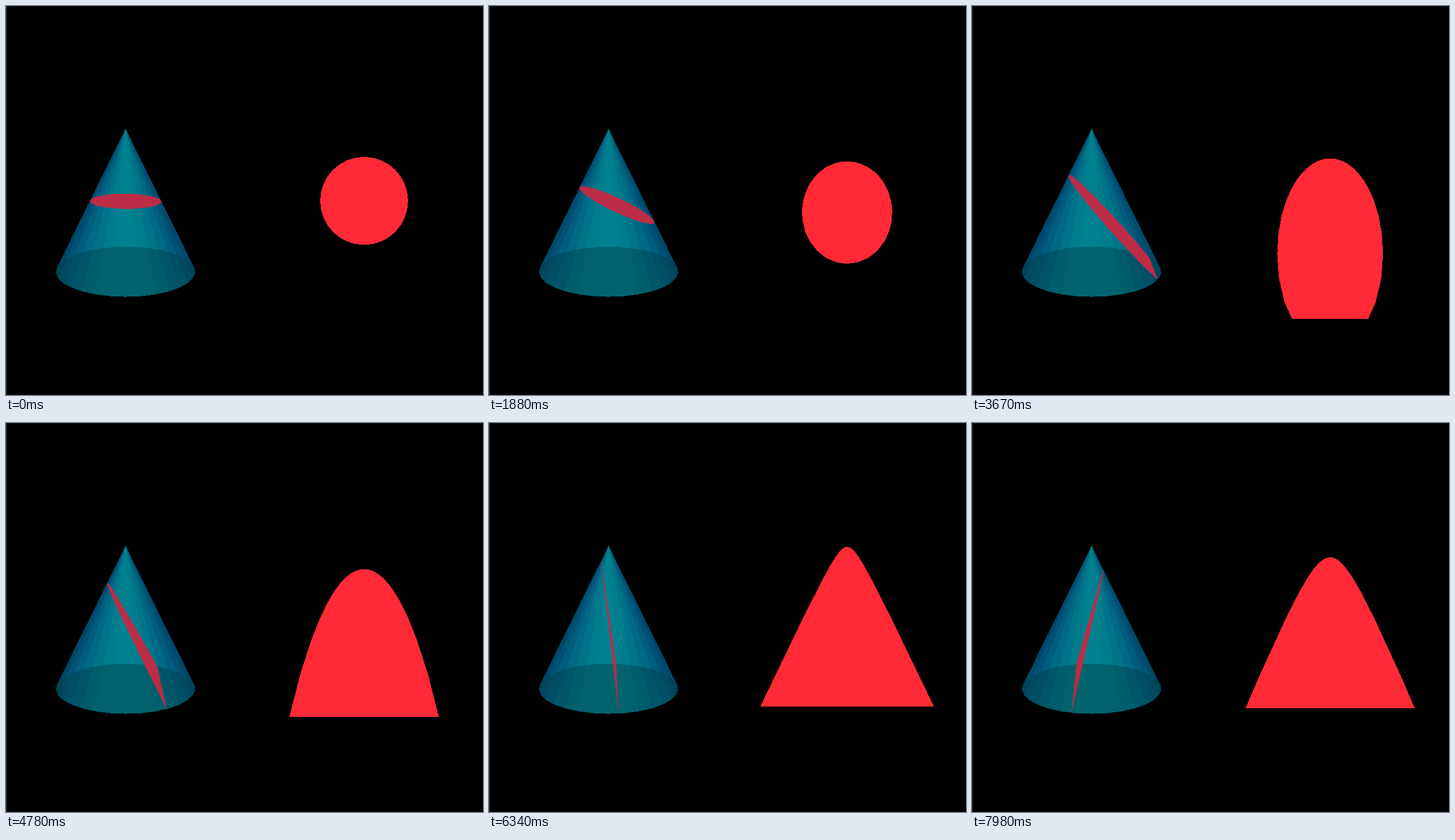
Recreate the animation shown at these times as an HTML page. Size 829 px wide and 675 px high, loop 8000 ms.

```html
<!DOCTYPE html>
<html lang="en">
<head>
<meta charset="utf-8">
<title>Conic sections</title>
<style>
  html, body { margin: 0; width: 100%; height: 100%; overflow: hidden; background: #000; }
  svg { display: block; width: 100%; height: 100%; }
</style>
</head>
<body>
<svg viewBox="0 0 829 675" shape-rendering="crispEdges">
  <rect width="829" height="675" fill="#000"/>
  <rect width="829" height="1" fill="#1c1c1c"/>
  <rect y="674" width="829" height="1" fill="#1d1214"/>
  <rect width="1" height="675" fill="#404040"/>
  <g id="cone"></g>
  <polygon id="cut" fill="#bc2c46"/>
  <polygon id="face" fill="#ff2a36"/>
</svg>
<script>
const LOOP = 8000, SIDES = 32, TAU = 2 * Math.PI;
const RADIUS = 2, TOP = 2, HEIGHT = 4;
const CAM = { x: 207.8, y: 337.8, scale: 61.8, dist: 12.8, sin: 0.21, cos: Math.sqrt(1 - 0.21 ** 2) };
const FLAT = { x: 622.4, y: 337.9, scale: 76.4 };
const cone = document.getElementById('cone');
const cut = document.getElementById('cut');
const face = document.getElementById('face');

// Perspective view from slightly above; z points to the viewer.
function project([x, y, z]) {
  const k = CAM.scale * CAM.dist / (CAM.dist - y * CAM.sin - z * CAM.cos);
  return [CAM.x + k * x, CAM.y - k * (y * CAM.cos - z * CAM.sin)];
}

const toPoints = list => list.map(p => p.map(v => v.toFixed(2)).join()).join(' ');

function addPolygon(points, fill) {
  const el = document.createElementNS('http://www.w3.org/2000/svg', 'polygon');
  el.setAttribute('points', toPoints(points.map(project)));
  el.setAttribute('fill', fill);
  cone.append(el);
}

const apex = [0, TOP, 0];
const rim = Array.from({ length: SIDES }, (_, i) => {
  const a = i * TAU / SIDES;
  return [RADIUS * Math.cos(a), TOP - HEIGHT, RADIUS * Math.sin(a)];
});
const next = i => rim[(i + 1) % SIDES];

function drawCone() {
  rim.map((p, i) => ({ p, q: next(i), facing: Math.sin((i + 0.5) * TAU / SIDES) }))
    .sort((a, b) => a.facing - b.facing)
    .forEach(({ p, q, facing }) => {
      const c = Math.max(0, facing);
      addPolygon([apex, p, q], `rgb(0,${Math.round(68 + 62 * c * c)},${Math.round(93 + 50 * c)})`);
    });
  addPolygon(rim, 'rgba(0,60,66,.42)');
}

// Corners where the plane x sin + y cos = 0 meets the cone's edges.
function section(angle) {
  const s = Math.sin(angle), c = Math.cos(angle);
  const side = p => p[0] * s + p[1] * c;
  const found = [];
  const meet = (p, q) => {
    const a = side(p), b = side(q);
    if (a * b >= 0) return;
    const k = a / (a - b);
    found.push(p.map((v, i) => v + k * (q[i] - v)));
  };
  rim.forEach((p, i) => { meet(apex, p); meet(p, next(i)); });

  const corners = found.map(p => ({ p, u: p[0] * c - p[1] * s, z: p[2] }));
  const mid = corners.reduce((sum, k) => sum + k.u, 0) / corners.length;
  return corners.sort((a, b) => Math.atan2(a.z, a.u - mid) - Math.atan2(b.z, b.u - mid));
}

function render(ms) {
  const corners = section((0.35 + 0.013 * ms) * Math.PI / 180);
  cut.setAttribute('points', toPoints(corners.map(k => project(k.p))));
  face.setAttribute('points', toPoints(corners.map(k =>
    [FLAT.x + FLAT.scale * k.z, FLAT.y + FLAT.scale * k.u])));
}

drawCone();
render(0);
const start = performance.now();
(function tick() {
  render((performance.now() - start) % LOOP);
  requestAnimationFrame(tick);
})();
</script>
</body>
</html>
```
